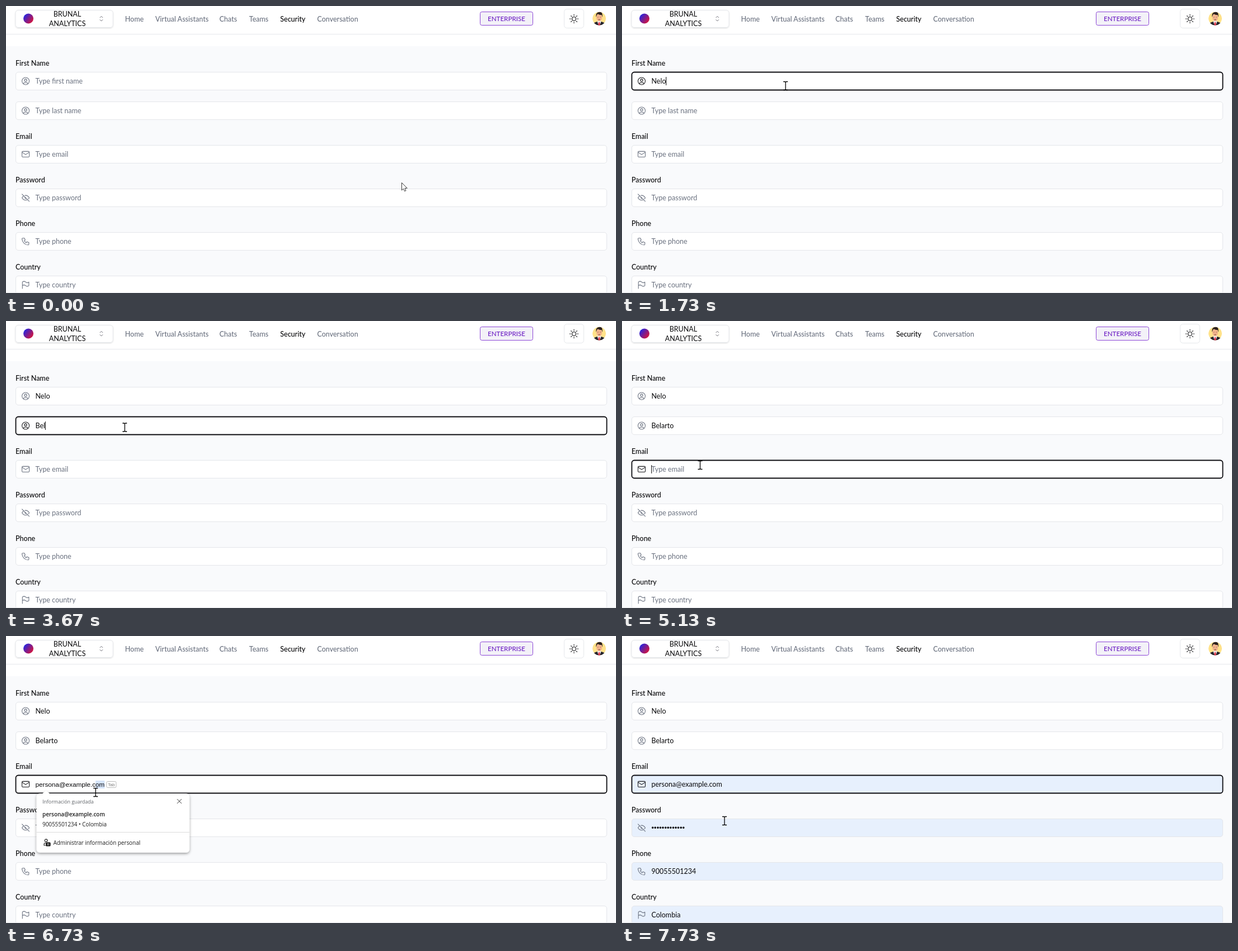
Animation of 1089x514 px, one loop 8000 ms. Source, as an HTML page:

```html
<!DOCTYPE html>
<html lang="en">
<head>
<meta charset="utf-8">
<title>Account form</title>
<style>
  html, body { margin: 0; width: 100%; height: 100%; overflow: hidden; background: #fff; }
  svg { display: block; }
  text { font: 12.5px Lato, sans-serif; fill: #09090b; white-space: pre; }
  .medium { font-weight: 500; }
  .muted { fill: #6b7280; }
  .middle { text-anchor: middle; }
  .badge { font-size: 11.6px; font-weight: 500; fill: #6d1fc4; }
  .preview { font: 11.7px "Liberation Sans", sans-serif; }
  .dots { font: 13.1px "Liberation Sans", sans-serif; }
  .tab { font: 7.5px "Liberation Sans", sans-serif; fill: #777; }
  .popup text { font: 9.9px "Open Sans", sans-serif; fill: #1f1f1f; }
  .popup .title { font-size: 8.8px; fill: #5f6368; }
  .popup .strong { font-weight: 600; }
  .line { fill: none; stroke-linecap: round; stroke-linejoin: round; }
</style>
</head>
<body>
<svg width="1089" height="514" viewBox="0 0 1089 514">
  <defs>
    <linearGradient id="orb" x1="0" y1="0.1" x2="1" y2="0.9">
      <stop offset="0.1" stop-color="#2626e0"/><stop offset="0.9" stop-color="#d5143c"/>
    </linearGradient>
    <clipPath id="face"><circle cx="1059" cy="22.5" r="12"/></clipPath>
    <filter id="soft" x="-10%" y="-20%" width="120%" height="150%">
      <feDropShadow dx="0" dy="1" stdDeviation="1.2" flood-opacity="0.13"/>
    </filter>
    <filter id="lift" x="-10%" y="-15%" width="120%" height="140%">
      <feDropShadow dx="0" dy="2" stdDeviation="2.8" flood-opacity="0.38"/>
    </filter>
  </defs>
  <rect width="1089" height="514" fill="#fff"/>
  <rect y="72" width="1089" height="442" fill="#f9fafc"/>
  <path d="M0 50.5H1089" stroke="#e5e7eb"/>

  <rect x="17" y="7.5" width="174" height="31" rx="5" fill="#fff" stroke="#e3e5e9" filter="url(#soft)"/>
  <circle cx="40" cy="22.5" r="9" fill="url(#orb)"/>
  <g class="middle medium"><text x="109.5" y="18.8">BRUNAL</text><text x="109.5" y="36">ANALYTICS</text></g>
  <path class="line" d="M167.8 20.8l2.4-2.4 2.4 2.4M167.8 24.6l2.4 2.4 2.4-2.4" stroke="#71717a"/>
  <g id="nav"></g>
  <rect x="846.5" y="10.5" width="94" height="24" rx="3" fill="#f3f1f8" stroke="#8b45d6"/>
  <text class="badge middle" x="893.5" y="26.8">ENTERPRISE</text>
  <rect x="996.5" y="5.5" width="35" height="34" rx="5" fill="#fff" stroke="#e5e7eb"/>
  <g class="line" transform="translate(1014 23)" stroke="#18181b" stroke-width="1.15">
    <circle r="3.5"/><g id="rays"></g>
  </g>
  <g clip-path="url(#face)">
    <circle cx="1059" cy="22.5" r="12" fill="#ffe28a"/>
    <path d="M1047 36q1-7 9-8h6q8 1 9 8z" fill="#25252d"/>
    <path d="M1055.500 26h7l-1 5-2.500 3-2.500-3z" fill="#f2efef"/>
    <path d="M1058 29h2l1 6h-4z" fill="#e33a4c"/>
    <ellipse cx="1059" cy="20.500" rx="5" ry="7" fill="#f3b48d"/>
    <path d="M1053.500 20q-1-6 2-8 5-3 8 0 2 3 1 8l-1-4q-5 0-7-2-2 2-3 6z" fill="#2b211f"/>
    <path d="M1056.300 20h1M1060.700 20h1M1057.500 24.300h3" stroke="#5b3128" stroke-width=".9"/>
  </g>

  <g id="scene"></g>
  <path d="M0 513.5H1089" stroke="#e8e9ec"/>
</svg>

<script>
const TICK = 200 / 3, TICKS = 120;
const EMAIL = "persona@example.com", PHONE = "90055501234", COUNTRY = "Colombia";
const SITE_FONT = "12.5px Lato, sans-serif";
const PREVIEW_FONT = '11.7px "Liberation Sans", sans-serif';

const USER = "M3 12a9 9 0 1 0 18 0a9 9 0 1 0-18 0M9 10a3 3 0 1 0 6 0a3 3 0 1 0-6 0" +
  "M6.2 18.8a4 4 0 0 1 3.800-2.800h4a4 4 0 0 1 3.800 2.800";
const MAIL = "M3 7a2 2 0 0 1 2-2h14a2 2 0 0 1 2 2v10a2 2 0 0 1-2 2H5a2 2 0 0 1-2-2zM3 7l9 6 9-6";
const EYE_OFF = "M10.6 10.6a2 2 0 0 0 2.800 2.800M16.7 16.7A8.700 8.700 0 0 1 12 18q-5.400 0-9-6 1.900-3.200 4.300-4.700" +
  "M10.2 6.200A9 9 0 0 1 12 6q5.400 0 9 6-1 1.700-2.100 2.900M3 3l18 18";
const CALL = "M5 4h4l2 5-2.500 1.500a11 11 0 0 0 5 5L15 13l5 2v4a2 2 0 0 1-2 2A16 16 0 0 1 3 6a2 2 0 0 1 2-2";
const FLAG = "M4 21V5a6 6 0 0 1 8 0a6 6 0 0 0 8 0v9a6 6 0 0 1-8 0a6 6 0 0 0-8 0";

// typed: [tick, number of letters]
const fields = [
  { y: 134.5, label: "First Name", hint: "Type first name", icon: USER, word: "Nelo",
    typed: [[21, 1], [24, 2], [25, 3], [26, 4]] },
  { y: 187.5, hint: "Type last name", icon: USER, word: "Belarto",
    typed: [[43, 1], [47, 2], [48, 3], [51, 4], [55, 3], [57, 4], [59, 5], [60, 6], [61, 7]] },
  { y: 265.5, label: "Email", hint: "Type email", icon: MAIL, word: EMAIL, fill: 102,
    typed: [[82, 1], [83, 2], [85, 3], [86, 4], [89, 8], [90, 13], [92, 17], [108, 19]] },
  { y: 343.5, label: "Password", hint: "Type password", icon: EYE_OFF, word: "•".repeat(13), fill: 108, secret: true },
  { y: 421.5, label: "Phone", hint: "Type phone", icon: CALL, word: PHONE, fill: 102 },
  { y: 499.5, label: "Country", hint: "Type country", icon: FLAG, word: COUNTRY, fill: 102 },
];
const focusSteps = [[13, 0], [38, 1], [76, 2]];
const COMPLETE = 83, HOVER = 102, ACCEPT = 108;

const pointerPath = [
  [0, 706, 316], [2, 347, 183], [5, 347, 183], [12, 292, 143], [33, 292, 143], [39, 212, 190.5],
  [68, 212, 190.5], [77, 139.5, 258], [78, 139.5, 258], [81, 168, 246], [99, 168, 246],
  [103, 152, 314], [111, 152, 314], [116, 183, 331], [120, 183, 331],
];

const ruler = document.createElement("canvas").getContext("2d");
function widthOf(string, font) {
  ruler.font = font;
  return ruler.measureText(string).width;
}
const text = (x, y, string, style = "") => `<text x="${x}" y="${y}" class="${style}">${string}</text>`;
const latest = (steps, tick) => steps.filter(step => step[0] <= tick).pop();

function pointerAt(tick) {
  const i = pointerPath.findIndex(point => point[0] > tick);
  const [t0, x0, y0] = pointerPath[i - 1], [t1, x1, y1] = pointerPath[i];
  const p = (tick - t0) / (t1 - t0);
  return [x0 + (x1 - x0) * p, y0 + (y1 - y0) * p];
}

function drawPointer(tick) {
  const [x, y] = pointerAt(tick);
  const overField = fields.some(field => Math.abs(y - field.y) < 16);
  const shape = overField
    ? `<path class="line" d="M-3.500-7.500H-1L0-6.500 1-7.500H3.500M0-6.500V6.500M-3.500 7.500H-1L0 6.500 1 7.500H3.500" stroke="#000" stroke-width="1.3"/>`
    : `<path d="M.5.500V14L3.600 11.200 5.600 15.700 7.900 14.700 6 10.300H10.200Z" fill="#fff" stroke="#222" stroke-width=".9"/>`;
  return `<g transform="translate(${x} ${y})">${shape}</g>`;
}

function drawField(field, focused, focusTick, tick) {
  const { y, label, hint, icon, word, fill, typed, secret } = field;
  const filled = tick >= fill, previewing = filled && tick < ACCEPT;
  const step = typed && latest(typed, tick);
  const entered = step ? word.slice(0, step[1]) : "";
  const completing = fill && typed && tick >= COMPLETE && !filled;
  const value = filled || completing ? word : entered;
  const preview = previewing || completing;
  const baseline = y + 4.2;

  let out = label ? text(17, y - 27.5, label, "medium") : "";
  out += `<rect x="17.500" y="${y - 16}" width="1055" height="32" rx="4.500" fill="${filled ? "#e7f0fd" : "#fff"}"
    stroke="${focused ? "#0b0b0f" : "#e4e6ea"}" stroke-width="${focused ? 1.8 : 1}"/>`;
  out += `<path class="line" d="${icon}" transform="translate(26.400 ${y - 8.7}) scale(.72)"
    stroke="${focused ? "#18181b" : "#6b7280"}" stroke-width="1.5"/>`;

  if (completing) {
    const start = 52.5 + widthOf(entered, PREVIEW_FONT), end = 52.5 + widthOf(word, PREVIEW_FONT);
    out += `<rect x="${start}" y="${y - 6.5}" width="${end - start}" height="14" fill="#d6e5fa"/>
      <rect x="${end + 3.5}" y="${y - 5}" width="17" height="11" rx="2" fill="#fff" stroke="#aaa" stroke-width=".8"/>`;
    out += text(end + 12, y + 3.2, "Tab", "tab middle");
  }
  out += value
    ? text(52.5, baseline, value, preview ? "preview" : secret ? "dots" : "")
    : text(52.5, baseline, hint, "muted");

  const changed = Math.max(focusTick, step ? step[0] : 0);
  const caretOn = Math.floor((tick - changed) / 8) % 2 === 0;
  if (focused && !preview && caretOn) {
    const x = 52.8 + widthOf(entered, SITE_FONT);
    out += `<path d="M${x} ${y - 7.5}v15" stroke="#000"/>`;
  }
  return out;
}

function drawPopup(x, y, width, entries, hovered) {
  const bottom = y + 24 + entries.length * 45, right = x + width;
  let out = `<g filter="url(#lift)"><rect x="${x}" y="${y}" width="${width}" height="${bottom + 37 - y}" rx="6" fill="#fff"/>
    <path d="M64 ${y + 1}l7.500-6 7.500 6z" fill="#fff"/></g>`;
  out += text(x + 10.5, y + 18, "Información guardada", "title");
  out += `<path d="M${right - 22} ${y + 10}l8 8m0-8l-8 8" stroke="#333"/>`;
  if (hovered) out += `<rect x="${x + 4}" y="${y + 23}" width="${width - 8}" height="45" rx="2" fill="#e3e3e3"/>`;
  entries.forEach(([title, detail], i) => {
    out += text(x + 10.5, y + 41 + i * 45, title, "strong") + text(x + 10.5, y + 58.5 + i * 45, detail);
  });
  out += `<path d="M${x} ${bottom + 46 - 45.5}H${right}" stroke="#dcdcdc"/>`;
  out += `<g transform="translate(${x + 12} ${bottom + 12})"><circle cx="5" cy="3.200" r="2.300" fill="none" stroke="#222" stroke-width="1.2"/>
    <path d="M4 12H1.500V10q0-2.500 3-2.500" fill="none" stroke="#222" stroke-width="1.2"/>
    <rect x="4.500" y="6.500" width="8.500" height="7" rx="1.500" fill="#111"/><path d="M6.500 9h4.500M6.500 11h4.500" stroke="#fff" stroke-width=".8"/></g>`;
  out += text(x + 30, bottom + 22.5, "Administrar información personal");
  return `<g class="popup">${out}</g>`;
}

function drawPopups(tick) {
  const contact = [EMAIL, `${PHONE} • ${COUNTRY}`];
  if (tick >= 17 && tick < 22) return drawPopup(54.5, 150, 273, Array(3).fill(["Nelo", EMAIL]));
  if (tick >= 79 && tick < COMPLETE) return drawPopup(22, 282, 339, Array(3).fill(contact));
  if (tick >= COMPLETE && tick < ACCEPT) return drawPopup(54.5, 282, 273, [contact], tick >= HOVER);
  return "";
}

function drawScene(tick) {
  const [focusTick, focus] = latest(focusSteps, tick) || [0, -1];
  return fields.map((field, i) => drawField(field, i === focus, focusTick, tick)).join("") +
    drawPopups(tick) + drawPointer(tick);
}

const nav = { "Home": 212.5, "Virtual Assistants": 266.5, "Chats": 381, "Teams": 434, "Security": 489.5, "Conversation": 555.5 };
document.getElementById("nav").innerHTML = Object.entries(nav)
  .map(([name, x]) => text(x, 27.5, name, name === "Security" ? "medium" : "medium muted")).join("");
document.getElementById("rays").innerHTML = Array.from({ length: 8 }, (_, i) =>
  `<path d="M0-6V-7.600" transform="rotate(${i * 45})"/>`).join("");

const scene = document.getElementById("scene");
let shown = -1;
function frame(now) {
  // A small lead keeps rounded millisecond times on the right side of a tick.
  const tick = Math.floor((now + 4) / TICK) % TICKS;
  if (tick !== shown) scene.innerHTML = drawScene(shown = tick);
  requestAnimationFrame(frame);
}
frame(0);
</script>
</body>
</html>
```
